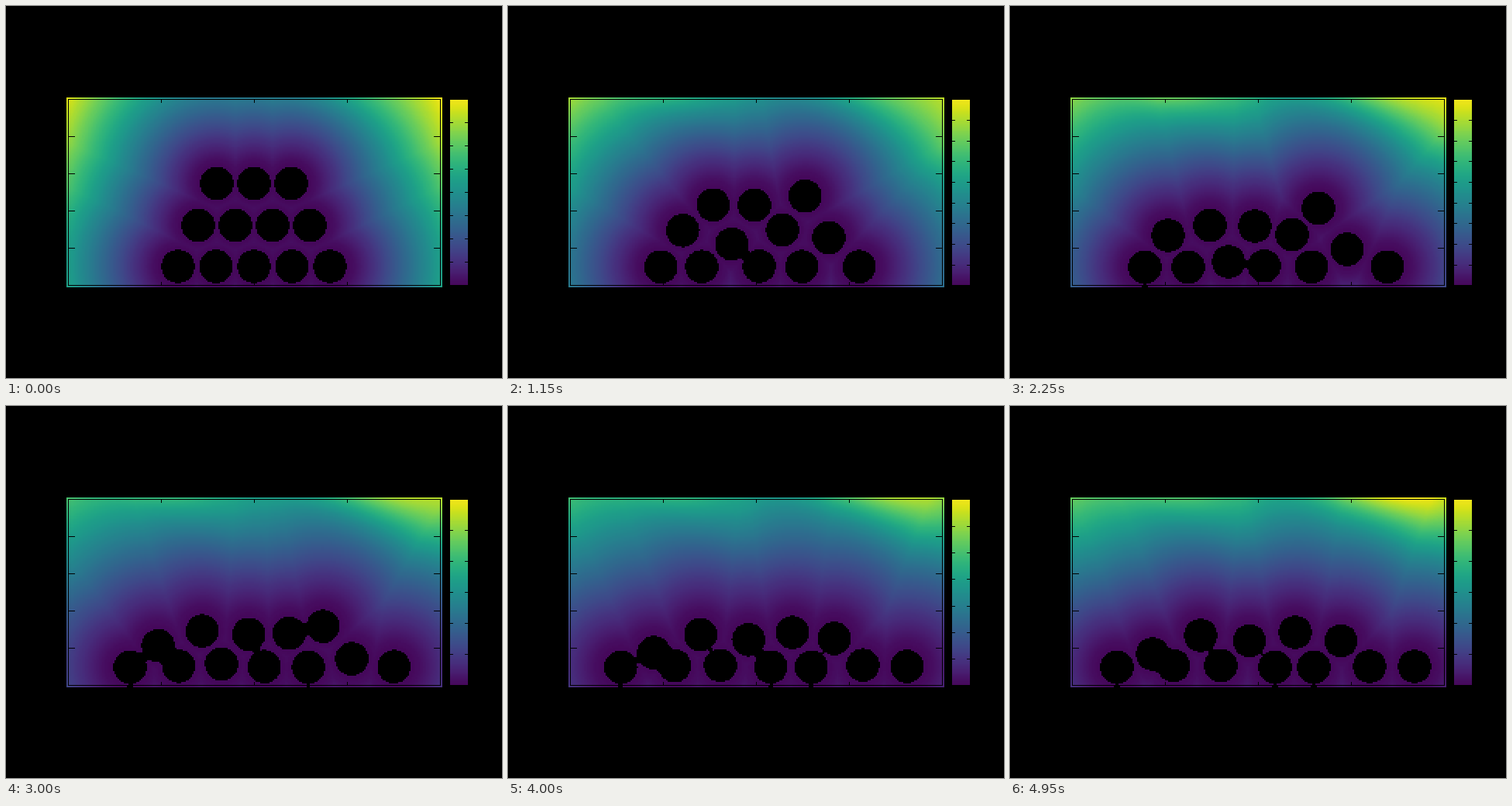
Recreate the animation shown at these times as a matplotlib script. Size 640x480 px, loop 5 s.

```python
import math

import matplotlib.pyplot as plt
import numpy as np
from matplotlib.animation import FuncAnimation
from matplotlib.colors import ListedColormap

FRAMES, INTERVAL = 100, 50
WIDTH, HEIGHT = 640, 480
LEFT, RIGHT, TOP, BOTTOM = 80, 560, 120, 360    # black outline of the field
RADIUS, UNIT = 21.5, 24                         # disc radius, length unit
CONTACT, FLOOR_CONTACT, FLOOR = 47.5, 26.2, 363
MID_FRAME = 45

# The pile stands in rows of 5, 4 and 3 discs, slumps, then settles.
START = np.array([(320 + gap * (i - (n - 1) / 2), y)
                  for n, y, gap in ((5, 336, 49), (4, 283, 48), (3, 229, 48))
                  for i in range(n)])
SLUMPED = np.array([
    (174, 337), (230, 336.7), (328, 335.5), (389, 336.7), (487, 336.7),
    (204, 296), (282, 330), (364, 295), (435, 314),
    (258, 283), (316, 284), (398, 261)])
SETTLED = np.array([
    (138, 337), (211, 335), (342, 337), (392, 337), (522, 336),
    (184, 320), (272, 335), (368, 292), (464, 336),
    (246, 296), (309, 303), (427, 303)])
SETTLE_POWER = np.array([1.5, 2.5])             # discs drop faster than they roll

# Cells of two pixels.
XS = np.arange(LEFT - 1, RIGHT + 4, 2, dtype=float)
YS = np.arange(TOP - 1, BOTTOM + 4, 2, dtype=float)
GX, GY = np.meshgrid(XS, YS)
SHEARED_X = np.clip(GX - 0.9 * (GY - TOP), LEFT, RIGHT)
TOP_WEIGHT = np.clip((250 - GY) / 130, 0, 1) ** 2


def discs(frame):
    if frame < MID_FRAME:
        return START + (SLUMPED - START) * frame / MID_FRAME
    u = (frame - MID_FRAME) / (FRAMES - 1 - MID_FRAME)
    return SLUMPED + (SETTLED - SLUMPED) * (1 - (1 - u) ** SETTLE_POWER)


def bump(x, center, width):
    return np.exp(-((x - center) / width) ** 2 / 2)


def top_boost(x, frame):
    """Brighter patches along the top: one on the left, one drifting right."""
    sweep = min(frame / 60, 1)
    left = 0.25 * min(frame / 20, 1) * bump(x, 230, 48)
    right = (0.15 + 0.35 * sweep) * bump(x, 450 + 40 * sweep, 60)
    return left + right


def strength(gap, frame):
    gain = np.interp(frame, [45, 60, 72, 88, 99], [1, 0.55, 0.585, 0.64, 0.585])
    d = np.maximum(gap, 0) / UNIT
    return gain * d * d / (d + 0.6)


def field(frame):
    """Field as a share of the scale, with holes for the discs, and the scale."""
    cx, cy = discs(frame).T
    dist2 = (GX - cx[:, None, None]) ** 2 + (GY - cy[:, None, None]) ** 2
    near, second = np.sqrt(np.partition(dist2, 1, axis=0)[:2])
    hole = ((near < RADIUS)
            | (near + second < CONTACT)
            | (near + FLOOR - GY < FLOOR_CONTACT))

    value = strength(near - RADIUS, frame)
    value *= 1 + TOP_WEIGHT * top_boost(SHEARED_X, frame)
    scale = math.ceil(value[0].max() - 0.1)
    return np.where(hole, np.nan, value / scale), scale


def draw_outline(canvas):
    canvas[[TOP, BOTTOM], LEFT:RIGHT + 1] = np.nan
    canvas[TOP:BOTTOM + 1, [LEFT, RIGHT]] = np.nan
    for x in range(LEFT + 120, RIGHT, 120):
        canvas[TOP:TOP + 5, x] = canvas[BOTTOM - 4:BOTTOM + 1, x] = np.nan
    for y in range(TOP + 48, BOTTOM, 48):
        canvas[y, LEFT:LEFT + 9] = canvas[y, RIGHT - 8:RIGHT + 1] = np.nan


def draw_bar(canvas, scale):
    canvas[121:360, 573:596] = np.linspace(1, 0, 239)[:, None]
    for k in range(1, scale):
        y = BOTTOM - 240 * k // scale
        canvas[y, 573:577] = canvas[y, 592:596] = np.nan


def render(frame):
    canvas = np.full((HEIGHT, WIDTH), np.nan)
    value, scale = field(frame)
    pixels = value.repeat(2, axis=0).repeat(2, axis=1)
    canvas[118:363, 78:563] = pixels[:245, :485]
    draw_outline(canvas)
    draw_bar(canvas, scale)
    return np.ma.masked_invalid(canvas)


cmap = ListedColormap(plt.get_cmap("viridis")(np.linspace(0.02, 0.98, 256)))
cmap.set_bad("black")

fig = plt.figure(figsize=(WIDTH / 100, HEIGHT / 100), dpi=100, facecolor="black")
ax = fig.add_axes([0, 0, 1, 1])
ax.axis("off")
image = ax.imshow(render(0), cmap=cmap, vmin=0, vmax=1, interpolation="nearest",
                  extent=(0, WIDTH, HEIGHT, 0), aspect="auto")


def draw(frame):
    image.set_data(render(frame))
    return (image,)


anim = FuncAnimation(fig, draw, frames=FRAMES, interval=INTERVAL,
                     init_func=lambda: draw(0), repeat=True, repeat_delay=0)
plt.show()
```
